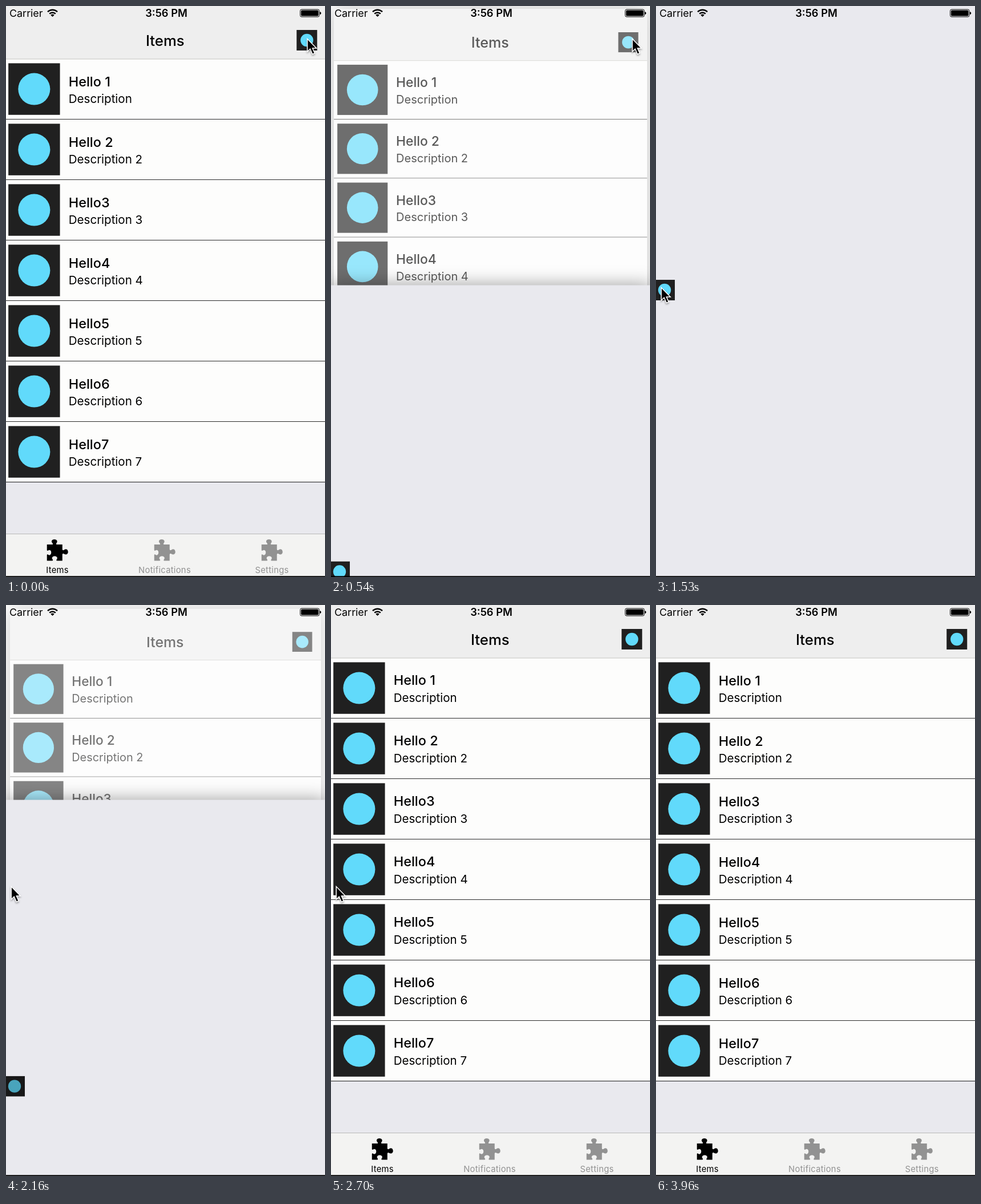
Animation, 559 px wide and 1001 px high, one loop 4050 ms. Source, as an HTML page:

```html
<!DOCTYPE html>
<html lang="en">
<head>
<meta charset="utf-8">
<title>Items</title>
<style>
html, body { margin: 0; width: 100%; height: 100%; overflow: hidden; background: #fff; }
#stage { position: absolute; left: 0; top: 0; width: 559px; height: 1001px; overflow: hidden; }
#stage > * { position: absolute; left: 0; top: 0; }
svg { display: block; }
#stage > #card { left: -1.75px; }
#stage > #sheet { left: -1.75px; top: -4px; width: 562.5px; height: 1010px; background: #e9e9ee; }
#card, #sheet { box-shadow: 0 0 30px rgba(0, 0, 0, .4); }
#sheet svg { position: absolute; left: -1.25px; top: 484px; }
text { font-family: Inter, Roboto, sans-serif; }
.title { font-size: 25.7px; font-weight: 500; text-anchor: middle; }
.name { font-size: 23.45px; font-weight: 500; }
.info { font-size: 20.55px; }
.tab { font-size: 14.75px; letter-spacing: .3px; text-anchor: middle; }
.status { font-size: 17.9px; }
.clock { font-size: 18.3px; font-weight: 600; text-anchor: middle; }
</style>
</head>
<body>
<div id="stage">
  <svg id="card" width="562.5" height="1000.5" viewBox="-1.75 0 562.5 1000.5"></svg>
  <div id="sheet"><svg id="button" width="36" height="36"></svg></div>
  <svg width="559" height="1001">
    <text class="status" x="6" y="19">Carrier</text>
    <g fill="none" stroke="#000" stroke-width="2.5">
      <path d="M73 10.2a12.2 12.2 0 0 1 17 0M76.2 13.6a7.6 7.6 0 0 1 10.6 0"/>
      <path d="M81.5 19l-3.2-3.3a4.6 4.6 0 0 1 6.4 0z" fill="#000" stroke="none"/>
    </g>
    <text class="clock" x="281" y="19">3:56 PM</text>
    <rect x="515.5" y="6" width="33.5" height="13" rx="2.5" fill="none" stroke="#000"/>
    <rect x="517" y="7.5" width="30.5" height="10" rx="1.5"/>
    <path d="M550 9.9q2.3 .5 2.3 2.6t-2.3 2.6z"/>
    <rect y="999.3" width="559" height="1.7"/>
    <path id="cursor" d="M0 0V22.5L5 17.8L9 27L13 25.3L9.1 16.4H16Z" stroke="#fff" stroke-width="1.5"
      style="filter:drop-shadow(0 2px 1.5px rgba(0,0,0,.35))"/>
  </svg>
</div>
<script>
const LOOP = 4050, STEP = 90;
const PUSH = 451, POP = 2096;
const OMEGA = 0.0191;
const HEIGHT = 1000.5;
const PUZZLE = 'M1 9H10.5C12 9 11.5 7.5 10.5 6.5C7.5 3 10 0 14 0S20.5 3 17.8 6.5C16.8 7.8 16.5 9 18.5 9H28V17' +
  'C28 19.5 30 19.5 31 18.5C34.5 15.5 38 18 38 22S34.5 28 31 25.5C29.5 24.5 28 25 28 27V37.5H19' +
  'C17 37.5 17.5 36 18.2 35C20.5 32 18 29.5 14.5 29.5S8.5 32 10.8 35C11.7 36.3 12 37.5 10 37.5H1V28' +
  'C1 26 2 26 3 26.8C6 29 8.5 26.5 8.5 23S6 17.5 3 19.5C2 20.2 1 20 1 18.5Z';

const $ = id => document.getElementById(id);
const card = $('card'), sheet = $('sheet'), button = $('button'), cursor = $('cursor');

const rect = (y, h, fill) => `<rect x="-2" y="${y}" width="564" height="${h}" fill="${fill}"/>`;
const text = (cls, x, y, s, fill = '#000') => `<text class="${cls}" x="${x}" y="${y}" fill="${fill}">${s}</text>`;
const tile = (x, y, size) =>
  `<rect x="${x}" y="${y}" width="${size}" height="${size}" fill="#202020"/>` +
  `<circle cx="${x + size / 2}" cy="${y + size / 2}" r="${size * 0.31}" fill="#61dafb"/>`;

function row(i) {
  const y = 93 + i * 106, n = i + 1;
  return rect(y, 106, '#fdfdfc') + rect(y + 105, 1.1, '#2b2b2b') + tile(4.4, y + 7.4, 90.4) +
    text('name', 110, y + 47.5, n < 3 ? `Hello ${n}` : `Hello${n}`) +
    text('info', 110, y + 77, n < 2 ? 'Description' : `Description ${n}`);
}

function tab(name, i) {
  const fill = i ? '#929292' : '#000';
  return `<path d="${PUZZLE}" transform="translate(${71 + 188 * i} 935)" fill="${fill}"/>` +
    text('tab', 90.3 + 188 * i, 994, name, fill);
}

card.innerHTML = rect(0, HEIGHT, '#e9e9ee') +
  Array.from({ length: 7 }, (_, i) => row(i)).join('') +
  rect(0, 93, '#eeeeee') + rect(92.5, 1, '#c6c6c2') +
  text('title', 279, 69.8, 'Items') + tile(509.5, 42, 36) +
  rect(925, 76, '#f3f3f2') + rect(925, 1, '#b8b8b8') +
  ['Items', 'Notifications', 'Settings'].map(tab).join('');
button.innerHTML = tile(0, 0, 36);

// Critically damped spring from 0 to 1
function spring(ms) {
  const x = Math.max(0, ms) * OMEGA;
  return 1 - (1 + x) * Math.exp(-x);
}

const clamp = u => Math.min(1, Math.max(0, u));
const smooth = u => u * u * (3 - 2 * u);

function draw(t) {
  const p = t < POP ? spring(t - PUSH) : 1 - spring(t - POP);
  card.style.opacity = 1 - 0.7 * p;
  card.style.transform = `translateY(${-15 * p}px) scale(${1 - 0.05 * p})`;
  sheet.style.transform = `translateY(${(1 - p) * HEIGHT}px)`;
  sheet.style.visibility = p > 0.005 ? 'visible' : 'hidden';
  button.style.filter = t >= 2070 ? 'brightness(.75)' : 'none';

  const go = smooth(clamp((t - 1050) / 470));
  const leave = smooth(clamp((t - 2790) / 270));
  cursor.setAttribute('transform', `translate(${528 - 518.8 * go - 40 * leave} ${57.5 + 436 * go})`);
}

function frame() {
  const t = performance.now() % LOOP;
  draw(Math.floor(t / STEP) * STEP);
  requestAnimationFrame(frame);
}
frame();
</script>
</body>
</html>
```
